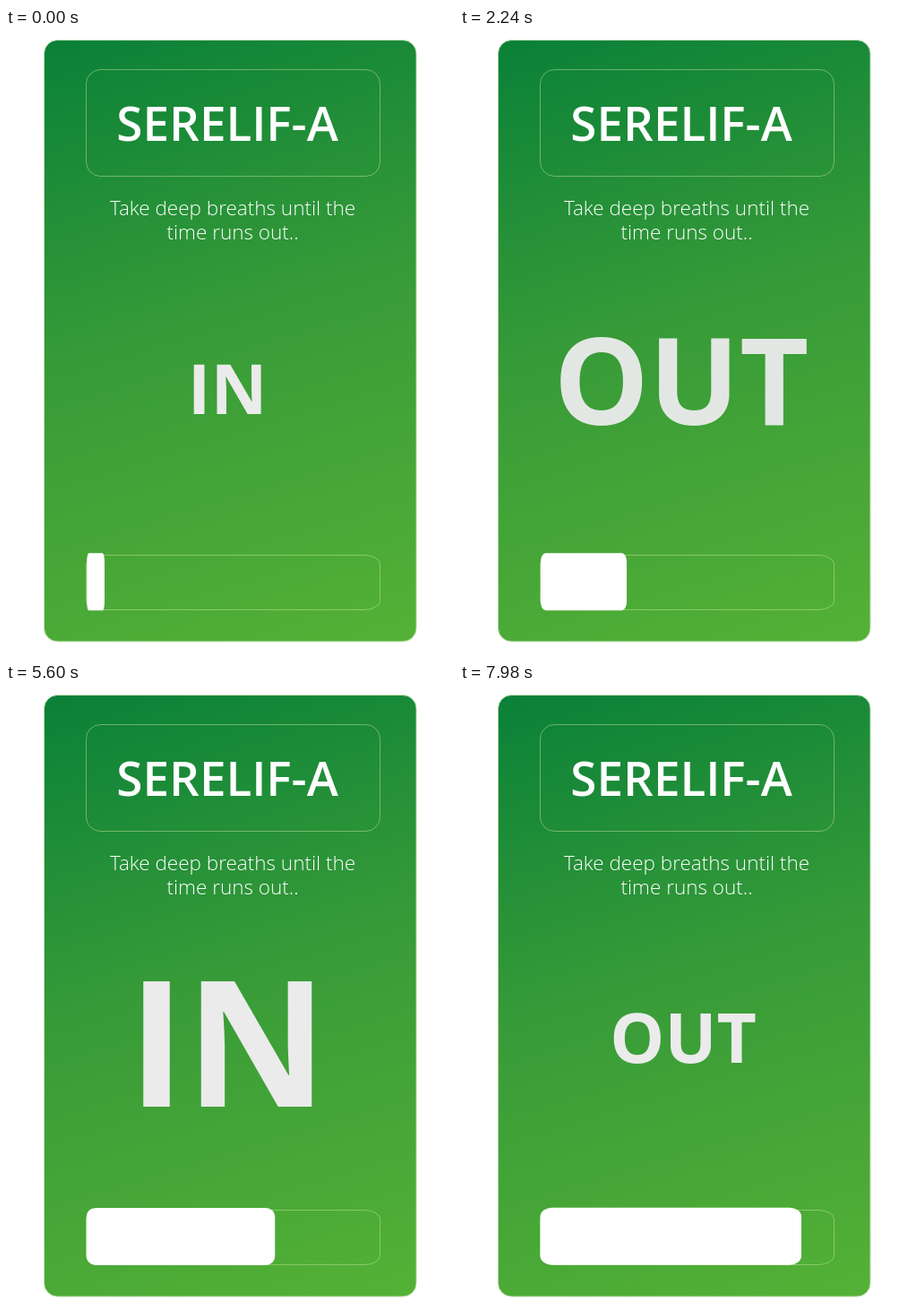
Recreate the animation shown at these times as an HTML page. Size 500 px wide and 700 px high, loop 8 s.

```html
<!DOCTYPE html>
<html lang="en">
<head>
<meta charset="utf-8">
<title>Breathing timer</title>
<style>
  html, body { margin: 0; width: 100%; height: 100%; overflow: hidden; background: #fff; }
  svg { display: block; width: 500px; height: 700px; }
  text { font-family: "Open Sans", "Noto Sans", sans-serif; text-anchor: middle; }
  .frame { fill: none; stroke: #d8e8a0; stroke-opacity: .45; }
  .title { font-size: 53px; font-weight: 600; fill: #fff; }
  .hint { font-size: 22.5px; font-weight: 300; fill: #fff; }
  .cue { font-size: 100px; font-weight: 700; fill: #ebebeb; }
</style>
</head>
<body>
<svg viewBox="0 0 500 700">
  <defs>
    <linearGradient id="leaf" gradientUnits="userSpaceOnUse" x1="140" y1="-12" x2="360" y2="710">
      <stop offset="0" stop-color="#0a8138"/>
      <stop offset=".45" stop-color="#369a38"/>
      <stop offset="1" stop-color="#54b136"/>
    </linearGradient>
  </defs>
  <rect x="42.5" y="13.5" width="415.5" height="671.5" rx="15" fill="url(#leaf)" stroke="#c3dfb4"/>
  <rect class="frame" x="89.5" y="46.5" width="328" height="119" rx="16"/>
  <text class="title" x="247" y="126">SERELIF-A</text>
  <text class="hint" x="253" y="209">Take deep breaths until the</text>
  <text class="hint" x="253" y="236">time runs out..</text>
  <rect class="frame" x="89.5" y="588.5" width="328" height="61" rx="18" ry="10"/>
  <rect id="bar" ry="10" height="64" fill="#fff"/>
  <g id="out"><text class="cue" x="-3.8" y="33">OUT</text></g>
  <g id="in"><text class="cue" y="35.2">IN</text></g>
</svg>
<script>
  const LOOP = 8000, TICK = 70, FADE = 240;
  const $ = id => document.getElementById(id);
  const clamp = v => Math.min(1, Math.max(0, v));
  const ramp = (t, from, to) => clamp((t - from) / (to - from));

  // Each breath scales linearly from start to end, with fades around it.
  const cues = {
    in: {
      x: 247.2, y: 404, from: .775, to: 2.56,
      breaths: [
        { start: 0, end: 1800, shown: -FADE },
        { start: 3449, end: 6720, shown: 3410 }
      ]
    },
    out: {
      x: 252, y: 398.5, from: 1.51, to: .46,
      breaths: [
        { start: 2010, end: 3410, shown: 2010 },
        { start: 6356, end: 8653, shown: 6356 }
      ]
    }
  };

  function drawCue(id, t) {
    const { x, y, from, to, breaths } = cues[id];
    const { start, end, shown } = breaths[t < breaths[1].shown ? 0 : 1];
    const scale = from + (to - from) * ramp(t, start, end);
    const opacity = ramp(t, shown, shown + FADE) * (1 - ramp(t, end, end + 200));
    $(id).setAttribute("transform", `translate(${x} ${y}) scale(${scale})`);
    $(id).setAttribute("opacity", opacity);
  }

  function drawBar(t) {
    const width = 20 + .03396 * t;
    const left = 90.2 - .7 * width / 328;
    const bar = $("bar");
    bar.setAttribute("x", left);
    bar.setAttribute("y", 586.4 - .8 * width / 328);
    bar.setAttribute("width", 90 + width - left);
    bar.setAttribute("rx", 1.5 + width * .042);
  }

  function draw() {
    const t = Math.floor(performance.now() % LOOP / TICK) * TICK;
    drawBar(t);
    drawCue("in", t);
    drawCue("out", t);
    requestAnimationFrame(draw);
  }
  draw();
</script>
</body>
</html>
```
